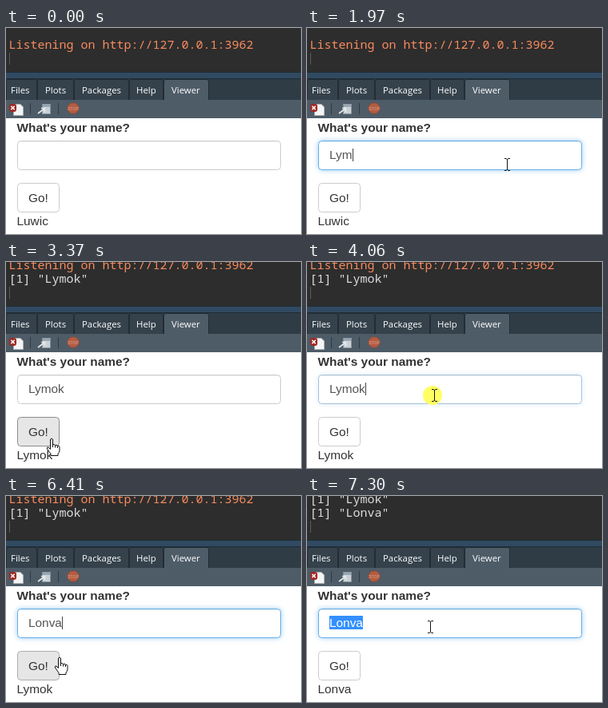
Animation, 369 px wide and 258 px high, one loop 8 s. Source, as an HTML page:

```html
<!DOCTYPE html>
<html lang="en">
<head>
<meta charset="utf-8">
<title>Name form</title>
<style>
html, body { margin: 0; width: 100%; height: 100%; overflow: hidden; background: #fff; }
svg { display: block; width: 369px; height: 258px; }
text { font: 15.4px "Liberation Sans", Arial, sans-serif; fill: #333; }
.mono { font: 500 15px "Noto Sans Mono", monospace; fill: #dedede; white-space: pre; }
.tabs text { font: 500 11.4px "Open Sans", "Noto Sans", sans-serif; fill: #fff; }
.cursor { stroke-linejoin: round; }
</style>
</head>
<body>
<svg viewBox="0 0 369 258">
  <rect width="369" height="258" fill="#fff"/>
  <rect width="369" height="56" fill="#2d2d2d"/>
  <text class="mono" id="row0" x="3.5" y="9"></text>
  <text class="mono" id="row1" x="3.5" y="26"></text>
  <path d="M4.5 31V46" stroke="#5c5c5c"/>

  <rect y="56" width="369" height="8" fill="#304a62"/>
  <path d="M0 55.5H369M0 63.5H369" stroke="#1d2a35"/>
  <rect y="64" width="369" height="26" fill="#2f3c46"/>
  <g class="tabs" id="tabs"></g>
  <rect y="90" width="369" height="23" fill="#4e5c68"/>
  <path d="M30.5 94V108M65.5 94V108" stroke="#2f3a44"/>
  <path d="M9.5 95.5H18L21.5 99V109.5H9.5Z" fill="#f4f4f4" stroke="#a9b0b5"/>
  <rect x="4" y="95" width="9" height="10" rx="3" fill="#9c2a24"/>
  <path d="M6.3 97.8L10.7 102.2M10.7 97.8L6.3 102.2" stroke="#fff" stroke-width="1.6"/>
  <rect x="45.5" y="95.5" width="10" height="12" fill="#c9d1d6" stroke="#87939c"/>
  <path d="M46 97.5H55" stroke="#8296a6" stroke-width="2"/>
  <path d="M40 107L48 101M44 100.5H48.5V105" fill="none" stroke="#e4e9ec" stroke-width="1.6"/>
  <path d="M81 94H87L91 98V103L87 107H81L77 103V98Z" fill="#b45c42" stroke="#8d4a38"/>
  <text x="84" y="102.5" text-anchor="middle" style="font-size:5px;fill:#d9a994">STOP</text>

  <text x="13.5" y="130" style="font-weight:bold">What's your name?</text>
  <rect id="field" x="14.5" y="141.5" width="329" height="36" rx="4" fill="#fff"/>
  <path d="M17 142.5H341" stroke="#000" opacity=".06"/>
  <rect id="mark" x="28" y="150" height="17" fill="#3390ff"/>
  <text id="value" x="28" y="164"></text>
  <path id="caret" d="M.5 151V167" stroke="#444"/>
  <rect id="button" x="14.5" y="194.5" width="52" height="36" rx="4"/>
  <text x="28" y="218">Go!</text>
  <text id="output" x="13.5" y="247"></text>

  <g id="pointer">
    <circle id="ring" cx="-2" r="12" fill="#ffff64"/>
    <path class="cursor" id="beam" fill="none" stroke="#111"
      d="M-3 -7.5H-1L.5 -6.5L2 -7.5H4M.5 -6.5V6.5M-3 7.5H-1L.5 6.5L2 7.5H4"/>
    <path class="cursor" id="arrow" fill="#fff" stroke="#111"
      d="M0 0V16L3.8 12.5L6.3 18L8.8 17L6.4 11.6H11.5Z"/>
    <path class="cursor" id="hand" fill="#fff" stroke="#111"
      d="M-1.5 1Q0 -1 1.5 1V8Q3 6.5 4.5 8.5Q6 7.3 7.5 9.3Q9.5 8.5 10 10.5V15Q9.5 18 8 19V21.5H-1V19.5L-5.5 13Q-6.5 10.5 -4 11L-1.5 13.5ZM1.5 8V11M4.5 8.5V11.5M7.5 9.3V12"/>
  </g>
</svg>
<script>
const LOOP = 8000, FRAME = 67.5, FADE = 110;
const names = ["Luwic", "Lymok", "Lonva"];
const log = ["", "Listening on http://127.0.0.1:3962", ...names.slice(1).map(n => `[1] "${n}"`)];
const keys = [[1500, 1770, 1970, 2070, 2170], [4800, 5000, 5110, 5220, 5320]];
const prints = [3370, 6690];
// start, end, from x, from y, to x, to y
const moves = [
  [200, 610, 259, 237, 250, 171],
  [2560, 2980, 250, 171, 57, 221],
  [3440, 3920, 57, 221, 159, 167],
  [5730, 5740, 159, 167, 139, 178],
  [5797, 6200, 139, 178, 67, 202],
  [6760, 7020, 67, 202, 154, 164]
];
const $ = id => document.getElementById(id);
const within = (t, ...spans) => spans.some(([a, b]) => t >= a && t < b);
const set = (id, attrs) => { for (const k in attrs) $(id).setAttribute(k, attrs[k]); };
const show = (id, on) => set(id, { visibility: on ? "visible" : "hidden" });
const mix = (a, b, p) => `rgb(${a.map((v, i) => Math.round(v + (b[i] - v) * p))})`;
const clamp = v => Math.max(0, Math.min(1, v));

$("tabs").innerHTML = [["Files", 0, 38, 6], ["Plots", 39, 84, 49], ["Packages", 85, 153, 95],
  ["Help", 154, 196, 163], ["Viewer", 197, 253, 207]].map(([name, a, b, x]) => {
    const fill = name == "Viewer" ? "#4e5c68" : "#35424c";
    return `<path d="M${a + .5} 91V67Q${a + .5} 64.5 ${a + 3} 64.5H${b - 2}Q${b + .5} 64.5 ${b + .5} 67V91"
      fill="${fill}" stroke="#222d36"/><text x="${x}" y="82">${name}</text>`;
  }).join("");

function pointerAt(t) {
  const [a, b, x0, y0, x1, y1] = moves.filter(m => m[0] <= t).pop() || moves[0];
  const steps = Math.round((b - a) / FRAME) + 1;
  const p = clamp((Math.floor((t - a) / FRAME + .1) + 1) / steps);
  const e = 1 - (1 - p) ** 2;
  return [x0 + (x1 - x0) * e, y0 + (y1 - y0) * e];
}

function drawForm(t, overButton) {
  const fade = start => clamp((t - start) / FADE);
  const focus = fade(680) - fade(3140) + fade(4020) - fade(6460) + fade(7040);
  set("field", { stroke: mix([204, 204, 204], [102, 175, 233], focus) });
  $("field").style.filter = `drop-shadow(0 0 3px rgba(102,175,233,${.65 * focus}))`;

  const round = t < keys[1][0] ? 0 : 1;
  const typed = names[round + 1].slice(0, keys[round].filter(k => k <= t).length);
  const selected = within(t, [4270, 4800], [7300, LOOP]);
  $("value").textContent = typed;
  $("value").style.fill = selected ? "#fff" : "#555";
  const width = typed ? $("value").getComputedTextLength() : 0;
  set("mark", { width });
  show("mark", selected);
  set("caret", { transform: `translate(${Math.round(28 + width)})` });
  show("caret", within(t, [680, 1280], [1500, 2700], [3990, 4270], [4800, 5850], [6340, 6480], [7090, 7300]));

  const pressed = within(t, [3160, 3300], [6480, 6610]);
  const held = within(t, [3160, 3990], [6480, 7020]);
  set("button", {
    fill: pressed ? "#d4d4d4" : held || overButton ? "#e6e6e6" : "#fff",
    stroke: held ? "#8c8c8c" : overButton ? "#adadad" : "#ccc"
  });
}

function draw(t) {
  const [x, y] = pointerAt(t);
  const inField = y > 141 && y < 179;
  const overButton = t > 2500 && x < 68 && y > 194;
  drawForm(t, overButton);

  const done = prints.filter(p => p <= t).length;
  $("output").textContent = names[done];
  for (const i of [0, 1]) {
    $("row" + i).textContent = log[done + i];
    $("row" + i).style.fill = done + i == 1 ? "#f98b5e" : "#dedede";
  }

  set("pointer", { transform: `translate(${Math.round(x)} ${Math.round(y)})` });
  const visible = t >= 200;
  show("beam", visible && inField);
  show("hand", visible && overButton);
  show("arrow", visible && !inField && !overButton);
  show("ring", within(t, [680, 810], [3160, 3300], [3990, 4130], [6480, 6610], [7020, 7160]));
}

function tick() {
  draw(performance.now() % LOOP);
  requestAnimationFrame(tick);
}
tick();
</script>
</body>
</html>
```
